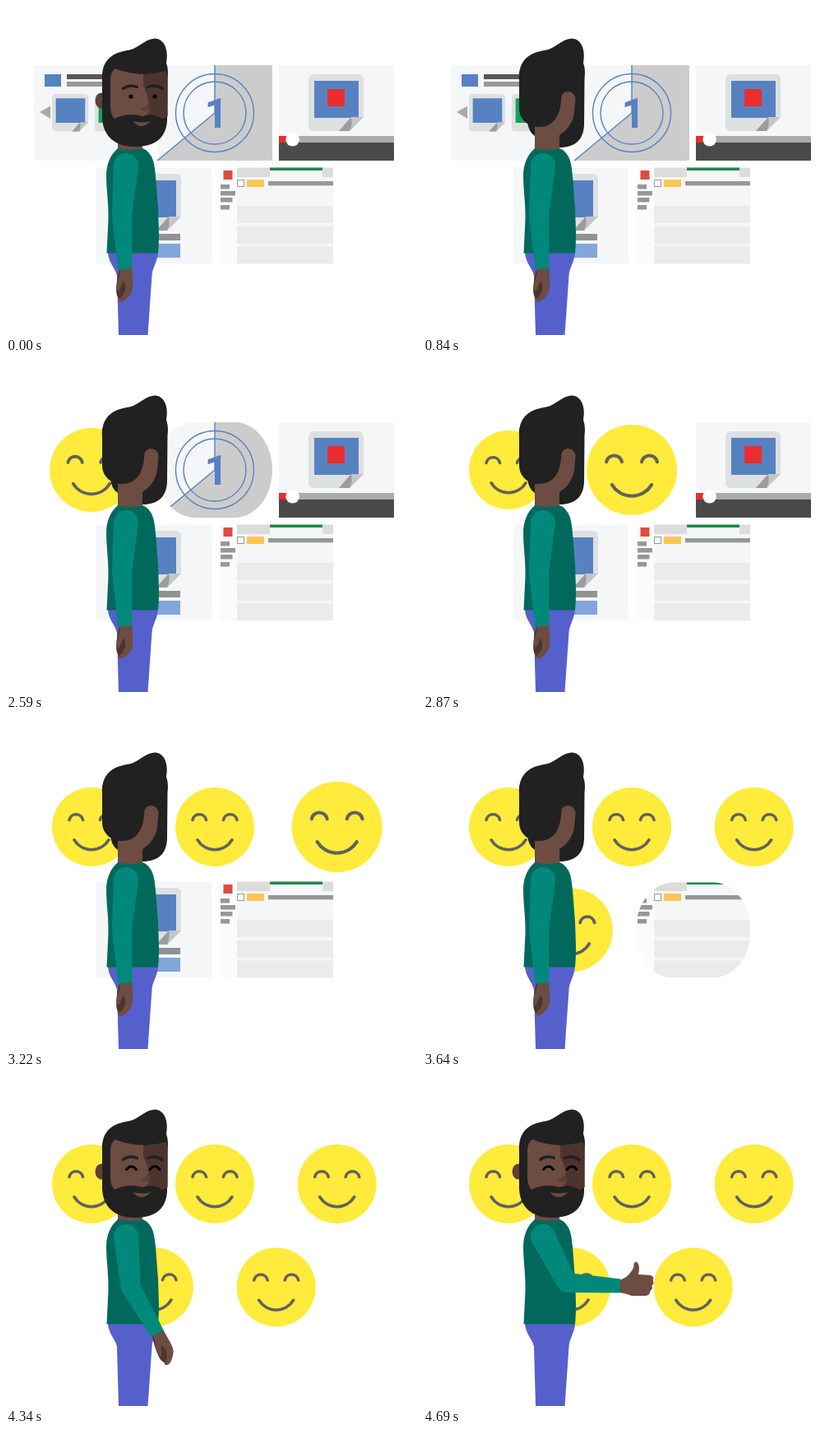
An HTML page that plays this animation: 500 by 400 pixels, repeating every 6300 ms.

```html
<!DOCTYPE html>
<html lang="en">
<head>
<meta charset="utf-8">
<title>Cards to smiles</title>
<style>
html, body { margin: 0; width: 100%; height: 100%; overflow: hidden; background: #fff; }
svg { display: block; width: 500px; height: 400px; }
text { font: 700 50px Roboto, sans-serif; }
</style>
</head>
<body>
<svg id="stage" viewBox="0 0 500 400"></svg>
<script>
const STEP = 70, LOOP = 6300;
const BLUE = '#5682c2', PALE = '#f4f6f8', GREY = '#979797', RED = '#ea2d2d';
const SKIN = '#6d4c41', SHADE = '#4e342e', HAIR = '#212121';
const TORSO = '#00695c', SLEEVE = '#00897b', TROUSERS = '#5660cc';

const rect = (x, y, w, h, fill) => `<rect x="${x}" y="${y}" width="${w}" height="${h}" fill="${fill}"/>`;
const circle = (x, y, r, fill) => `<circle cx="${x}" cy="${y}" r="${r}" fill="${fill}"/>`;
const path = (d, fill) => `<path d="${d}" fill="${fill}"/>`;
const line = (d, color, width) =>
  `<path d="${d}" fill="none" stroke="${color}" stroke-width="${width}" stroke-linecap="round"/>`;
const group = (transform, content) => `<g transform="${transform}">${content}</g>`;

// Paper icon with a folded corner, 67 x 69 at scale 1
const paper = (x, y, scale, color) => group(`translate(${x} ${y}) scale(${scale})`,
  path('M7 0H60Q67 0 67 7V52L50 69H7Q0 69 0 62V7Q0 0 7 0Z', '#dde0e0') +
  rect(7, 8, 54, 45, color) +
  path('M37 69L52 52H67L50 69Z', '#c6c6c6') +
  path('M37 69L52 52Q54 61 50 69Z', '#9c9c9c'));

const cards = [
  { x: 104, y: 130, art:
    rect(34, 72, 140, 116, PALE) + rect(47, 83, 20, 15, BLUE) +
    rect(74, 83, 80, 6, '#595555') + rect(74, 92, 80, 6, GREY) +
    path('M41 129L54 121.5V137Z', '#aaa') +
    paper(56, 107, .66, BLUE) + paper(108, 107, .66, '#12a05c') },
  { x: 254, y: 130, art:
    rect(184, 72, 140, 116, PALE) +
    path('M254 72H324V188H184L254 130Z', '#ccc') +
    `<g fill="none" stroke="${BLUE}" stroke-width="1.4"><path d="M254 72V130L184 188"/>
     <circle cx="254" cy="130" r="47.5"/><circle cx="254" cy="130" r="38"/></g>
     <text x="241.5" y="147.5" fill="${BLUE}">1</text>` },
  { x: 402.7, y: 130, art:
    rect(332, 72, 140, 116, PALE) + paper(368, 83, 1, BLUE) + rect(391, 101, 21, 21, RED) +
    rect(332, 166, 140, 22, '#4a4a4a') + rect(332, 158, 140, 8, '#aaa') +
    rect(332, 158, 10, 8, RED) + circle(348.6, 162.3, 8.3, '#fff') },
  { x: 180, y: 255.3, art:
    rect(110, 197, 140, 116, PALE) + paper(146, 204, 1, BLUE) +
    rect(148, 277, 64, 8, '#929292') + rect(148, 289, 64, 17, '#82a6da') },
  { x: 328.7, y: 255.5, art:
    rect(259, 197, 139, 116, '#fafbfb') + rect(281, 197, 117, 116, PALE) +
    rect(281, 196.5, 117, 11.5, '#dcdcdc') + rect(321, 197, 64, 11, PALE) +
    rect(321, 196.5, 64, 3.5, '#1f8a4c') + rect(264.5, 200, 11, 11, '#e04a3f') +
    [[217, 11], [225, 18], [233, 14.5], [242, 11]].map(([y, w]) => rect(261, y, w, 5.5, GREY)).join('') +
    `<rect x="281.5" y="211.5" width="8" height="8" fill="#fff" stroke="#999"/>` +
    rect(293, 211, 21, 9, '#fcc654') + rect(319, 213, 79, 5.3, GREY) +
    [243, 268, 292.5].map(y => rect(281, y, 117, 20.8, '#e9ebed')).join('') }
];

const smiley = circle(0, 0, 48, '#ffeb3b') +
  line('M-27 -8.5A8.4 8.4 0 0 1 -10.5 -8.5M10.5 -8.5A8.4 8.4 0 0 1 27 -8.5' +
       'M-21 15.8A24.5 24.5 0 0 0 21 15.8', '#616161', 3.6);

// Per step while a card turns into a smiley: clip width, height, corner rx, smiley opacity
const morph = [[140, 116, 46, 0], [122, 116, 58, .3], [110, 110, 55, .65]];
const bounce = [1.04, 1.146, 1.06];

function drawCard({ x, y, art }, i, step) {
  const k = step - 32 - 5 * i;
  if (k < 0) return art;
  const face = scale => group(`translate(${x} ${y}) scale(${scale})`, smiley);
  if (k >= morph.length) return face(bounce[k - morph.length] || 1);
  const [w, h, rx, opacity] = morph[k];
  return `<clipPath id="clip${i}"><rect x="${x - w / 2}" y="${y - h / 2}" width="${w}" height="${h}"
    rx="${rx}" ry="${h / 2}"/></clipPath><g clip-path="url(#clip${i})">${art}</g>
    <g opacity="${opacity}">${face(h / 96)}</g>`;
}

const body =
  path('M124 300H185C184 312 178 318 177.500 328L172.500 400H137L135 328C133 318 125 313 124 300Z', TROUSERS) +
  path('M136 173C127 181 122 192 122 207C122 226 126 245 124 270L122.500 300.500H185' +
       'C187 282 185.500 265 185 245C183 220 182 198 179 188Q175 176 165 172.500Z', TORSO) +
  path('M136 150V173Q151 177 166 173V150Z', SKIN);

const hangingHand =
  path('M138 320C135 332 133 345 135 352L139 359Q147 351 148 338Z', SHADE) +
  path('M139 318H153.500C153.500 333 156 342 152.500 349Q148 356 143 359Q138 361 136 357.500' +
       'Q142 354 145 346Q146 338 143 335C140 340 139 345 137 347Q133.500 345 135 337Q139 328 139 318Z', SKIN);
const thumbHand =
  path('M239 247C247 245 253 239 256.500 231Q256 224 260.500 225Q265 230 262 240L277 241Q282 243 280 247' +
       'Q281.500 251 278.500 254Q280 258 276.500 260Q277 265 271 266L254 266Q247 263 239 262Z', SKIN);

function drawArm(p) {
  const mix = (a, b) => a + (b - a) * p;
  const limb = (from, angle, length, r1, r2) => {
    const c = Math.cos(angle), s = Math.sin(angle);
    const to = [from[0] + length * c, from[1] + length * s];
    const side = ([x, y], r) => `${x - r * s} ${y + r * c}`;
    const d = `M${side(from, r1)}L${side(to, r2)}L${side(to, -r2)}L${side(from, -r1)}Z`;
    return { to, shape: path(d, SLEEVE) };
  };
  const shoulder = [146, 194];
  const forearmAngle = mix(1.51, .062);
  const upper = limb(shoulder, mix(1.653, 1.093), mix(61, 63), 15, 12);
  const lower = limb(upper.to, forearmAngle, 65, 12, 8.5);
  const [hand, wrist, rest] = p < .5 ? [hangingHand, '-145 -320', 1.51] : [thumbHand, '-240 -254', .062];
  const turn = (forearmAngle - rest) * 180 / Math.PI;
  return group(`translate(${lower.to}) rotate(${turn}) translate(${wrist})`, hand) +
    circle(...shoulder, 15, SLEEVE) + upper.shape + circle(...upper.to, 12, SLEEVE) + lower.shape;
}

const hairTop = 'M117 90C116 68 126 57 150 53.500C162 51 169 40 181 39.500C193 40 198 54 195 69Q198 78 196.500 88';
const skull = path(hairTop + 'L196 140C194 162 180 171 157 171C132 171 118 158 117 136Z', HAIR);

const openEyes = circle(152, 110, 2.6, '#000') + circle(181, 110, 2.6, '#000');
const happyEyes = line('M146.500 112.500Q152.500 105 158.500 112.500M175 112.500Q181 105 187 112.500', '#000', 3);

const frontHead = eyes =>
  `<ellipse cx="116" cy="115" rx="7.500" ry="9.500" fill="#5d4037"/>` + skull +
  path('M127 88Q128 79 133 76Q150 83 170 83Q186 82 194 79L196.500 86V134L190 137Q180 129 166 134' +
       'Q148 129 132 137Q127 132 127 122Z', SKIN) +
  path('M167 83Q184 83 194 79L196.500 86V134L190 137Q182 131 171 132Q176 127 174 121' +
       'Q173 108 167 97Z', SHADE) +
  path('M163 124Q168 130 175 127L173 117Q170 124 163 124Z', '#5d4037') +
  line('M142.500 100.500Q150 94.500 159.500 98.500M172.500 98.500Q182 94.500 190 100.500', HAIR, 3.5) + eyes +
  path('M154 140Q165 143 176 140Q165 152 154 140Z', SKIN);

const sideHead = frontHead(openEyes).replace(/<ellipse.*?\/>/, '') +
  path('M117 86H153V112Q151 136 142 147L125 150L117 136Z', HAIR) +
  `<ellipse cx="148" cy="114" rx="8" ry="9.500" fill="${SKIN}"/>`;

const backHead =
  path(hairTop + 'L196 145C195 163 185 172 166 172L136 158Q128 153 127 140L117 120Z', HAIR) +
  path('M136 140V173Q151 177 166 173V157C179 149 184 137 184.500 125L185.500 113' +
       'A9 9 0 0 0 167.500 113L160 138Z', SKIN) +
  path('M117 80V124C117 139 129 147 141 147C158 147 168 135 168.500 108L175 80Z', HAIR);

function drawHead(step) {
  if (step < 10) return frontHead(openEyes);
  if (step < 12) return sideHead;
  if (step < 60) return backHead;
  return step < 62 ? sideHead : frontHead(happyEyes);
}

function render(step) {
  const raise = Math.min(1, Math.max(0, (step - 59) / 8));
  const eased = raise * raise * (3 - 2 * raise);
  return cards.map((card, i) => drawCard(card, i, step)).join('') +
    body + drawArm(eased) + drawHead(step);
}

const stage = document.getElementById('stage');
let shown = -1;
function tick() {
  const step = Math.floor(performance.now() % LOOP / STEP);
  if (step !== shown) stage.innerHTML = render(shown = step);
  requestAnimationFrame(tick);
}
tick();
</script>
</body>
</html>
```
